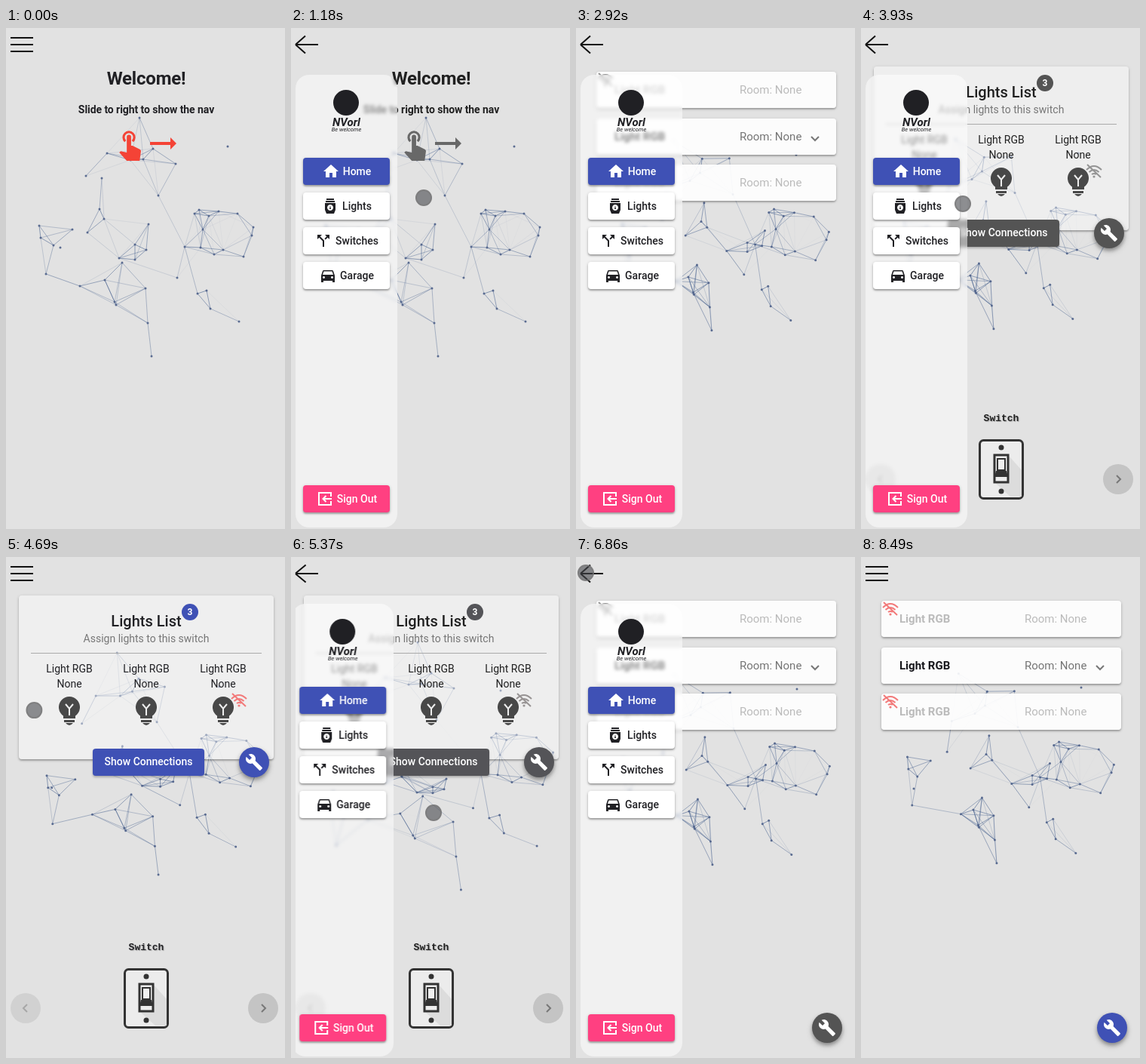
An HTML page with a canvas that plays this animation: 370 by 664 pixels, repeating every 8.53 s.

```html
<!DOCTYPE html>
<html lang="en">
<head>
<meta charset="utf-8">
<title>Smart home navigation</title>
<style>
  html, body { margin: 0; width: 100%; height: 100%; overflow: hidden; background: #e2e2e2; }
  body { font: 14px/20px Roboto, Arial, sans-serif; color: #202024; }
  #stage { position: relative; width: 370px; height: 664px; overflow: hidden; background: #e2e2e2; }
  #stage canvas, .page, #burger { position: absolute; left: 0; top: 0; width: 370px; height: 664px; }
  .page { visibility: hidden; }
  .at, .card, .fab, .menu button, .menu div { position: absolute; white-space: nowrap; }
  .mid { left: 186px; text-align: center; transform: translateX(-50%); }
  svg { display: block; fill: currentColor; overflow: visible; }
  .line { fill: none; stroke: currentColor; stroke-width: 2; }
  .red { color: #f44336; }
  .nowifi { left: 28px; width: 22px; height: 20px; color: #f27a7a; }
  .card { left: 27px; width: 318px; height: 48px; border-radius: 4px; background: rgba(255,255,255,.9);
    box-shadow: 0 2px 2px rgba(0,0,0,.22), 0 1px 4px rgba(0,0,0,.16); font-size: 15px; line-height: 48px; }
  .card b, .card span { position: absolute; top: 0; }
  .card b { left: 24px; color: #17171c; }
  .card span { left: 190px; color: #757575; }
  .card.off b, .card.off span { color: #bbb; }
  .fab { width: 40px; height: 40px; border-radius: 50%; background: #3f51b5; color: #fff;
    box-shadow: 0 3px 5px rgba(0,0,0,.3), 0 4px 9px rgba(0,0,0,.16); }
  .fab svg { position: absolute; left: 8px; top: 8px; }
  .panel { left: 17px; top: 51px; width: 338px; height: 217px; background: rgba(255,255,255,.42); }
  .title { top: 75px; font-size: 20px; font-weight: 500; }
  .badge { left: 233px; top: 62px; width: 22px; border-radius: 50%; background: #3f51b5; color: #fff;
    text-align: center; font-size: 12px; font-weight: bold; line-height: 22px; }
  .rule { left: 33px; top: 127px; width: 306px; height: 1px; background: #aaa; }
  .show { left: 115px; top: 254px; width: 148px; height: 36px; border-radius: 4px; background: #3f51b5;
    color: #fff; text-align: center; font-weight: 500; line-height: 35px; box-shadow: 0 2px 3px rgba(0,0,0,.25); }
  .name { top: 508px; font: bold 13px/20px 'Courier New', 'Liberation Mono', monospace; text-shadow: 1px 1px 1px #aaa; }
  .round { top: 578px; width: 40px; height: 40px; border-radius: 50%; background: #c4c4c4; color: #777; }
  #clip { position: absolute; left: 6px; top: 62px; width: 135px; height: 600px; overflow: hidden; }
  .menu { position: absolute; width: 135px; height: 600px; border-radius: 18px;
    background: rgba(255,255,255,.5); backdrop-filter: blur(2px); }
  .menu .logo { left: 50px; top: 20px; width: 34px; height: 34px; border-radius: 50%; background: #202024; }
  .menu .brand { width: 100%; top: 53px; text-align: center; font-size: 15px; font-weight: bold; font-style: italic; }
  .menu .motto { width: 100%; top: 63px; text-align: center; font-size: 7.5px; font-style: italic; }
  .menu button { left: 10px; width: 115px; height: 36px; padding: 0; border: 0; border-radius: 4px; background: #fff;
    color: #202024; font: 500 14px/36px Roboto, Arial, sans-serif; display: flex; gap: 4px;
    align-items: center; justify-content: center;
    box-shadow: 0 2px 2px rgba(0,0,0,.25), 0 1px 4px rgba(0,0,0,.18); }
  .menu .home { background: #3f51b5; color: #fff; }
  .menu .out { background: #ff4081; color: #fff; }
  .out svg { transform: scaleX(-1); }
  #touch { position: absolute; left: -11px; top: -11px; width: 18px; height: 18px; border-radius: 50%;
    border: 2px solid rgba(120,120,120,.65); background: rgba(70,72,78,.6); }
</style>
</head>
<body>
<svg width="0" height="0" style="position:absolute">
  <symbol id="hand" viewBox="0 0 24 24"><path class="line" style="stroke-width:1.6" d="M9 10.500a3.700 3.700 0 1 1 5 0"/><path d="M10 18.200V7.500a1.500 1.500 0 0 1 3 0v6h1l5 2.500q1 .5 .8 1.500l-.9 6.500H10L4.800 18.300l1-1z"/></symbol>
  <symbol id="house" viewBox="0 0 24 24"><path d="M10 20v-6h4v6h5v-8h3L12 3 2 12h3v8z"/></symbol>
  <symbol id="lantern" viewBox="0 0 24 24"><path fill-rule="evenodd" d="M7 2h10v2H7zM6 5h12v2H6zM5 8h14v9l-2 5H7l-2-5zM12 10a4 4 0 1 0 .01 0zM12 11l1 5h-2z"/></symbol>
  <symbol id="split" viewBox="0 0 24 24"><path d="M14 4l2.300 2.300-2.900 2.900 1.400 1.400 2.900-2.900L20 10V4zM10 4H4v6l2.300-2.300 4.700 4.700V20h2v-8.400L7.700 6.300z"/></symbol>
  <symbol id="car" viewBox="0 0 24 24"><path fill-rule="evenodd" d="M19 6q-.4-1-1.500-1h-11Q5.400 5 5 6l-2 6v9h3v-2h12v2h3v-9zM6.500 16a1.500 1.500 0 1 1 .01 0zM17.500 16a1.500 1.500 0 1 1 .01 0zM5 11l1.500-4.500h11L19 11z"/></symbol>
  <symbol id="exit" viewBox="0 0 24 24"><path class="line" d="M4 9V4h16v16H4v-5M3 12h11M10.500 8l4 4-4 4"/></symbol>
  <symbol id="wrench" viewBox="0 0 24 24"><path d="M22.700 19l-9.100-9.100c.9-2.300.4-5-1.500-6.900-2-2-5-2.400-7.400-1.300L9 6 6 9 1.600 4.700C.4 7.100.9 10.100 2.900 12.100c1.900 1.900 4.600 2.400 6.900 1.500l9.100 9.100q.7.6 1.400 0l2.300-2.300q.7-.7.1-1.400z"/></symbol>
  <symbol id="nowifi" viewBox="0 0 22 20"><path class="line" d="M1 8Q11-2 21 8M4.500 11Q11 5 17.500 11M8 14q3-2 6 0M2 1l18 17"/><circle cx="11" cy="17" r="1.600"/></symbol>
  <symbol id="bulb" viewBox="0 0 28 38"><path d="M6 25.500a14 14 0 1 1 16 0V29H6zM7 31h14v3H7zM9 35h10q-5 6-10 0z"/><path d="M9 10l5 6 5-6M14 16v9" fill="none" stroke="#eee" stroke-width="2"/></symbol>
</svg>

<div id="stage">
  <canvas id="mesh" width="370" height="664"></canvas>

  <div class="page" id="home">
    <b class="at mid" style="top:57px;font-size:24px;letter-spacing:-.2px">Welcome!</b>
    <b class="at mid" style="top:98px;letter-spacing:-.07px">Slide to right to show the nav</b>
    <svg class="at red" style="left:141px;top:130px" width="46" height="46"><use href="#hand"/></svg>
    <svg class="at red" style="left:191px;top:145px" width="35" height="16"><path d="M0 6h27V0l8 8-8 8v-6H0z"/></svg>
  </div>

  <div class="page" id="lights">
    <div class="card off" style="top:58px"><b>Light RGB</b><span>Room: None</span></div>
    <div class="card" style="top:120px"><b>Light RGB</b><span>Room: None</span>
      <svg class="at" style="left:285px;top:24px;color:#777" width="10" height="6"><path class="line" d="M0 0l5 5 5-5"/></svg></div>
    <div class="card off" style="top:181px"><b>Light RGB</b><span>Room: None</span></div>
    <svg class="at nowifi" style="top:59px"><use href="#nowifi"/></svg>
    <svg class="at nowifi" style="top:182px"><use href="#nowifi"/></svg>
    <div class="fab" id="tool" style="left:313px;top:604px"><svg width="24" height="24"><use href="#wrench"/></svg></div>
  </div>

  <div class="page" id="switches">
    <div class="card panel"></div>
    <div class="at mid title">Lights List</div>
    <div class="at badge">3</div>
    <div class="at mid" style="top:98px;color:#777">Assign lights to this switch</div>
    <div class="at rule"></div>
    <div id="lamps"></div>
    <svg class="at nowifi" style="left:298px;top:180px"><use href="#nowifi"/></svg>
    <div class="at show">Show Connections</div>
    <div class="fab" style="left:309px;top:252px"><svg width="24" height="24"><use href="#wrench"/></svg></div>
    <b class="at mid name">Switch</b>
    <svg class="at" style="left:156px;top:545px;color:#333" width="60" height="80">
      <rect class="line" style="fill:#ececec;stroke-width:3" x="1.500" y="1.500" width="57" height="77" rx="5"/>
      <path d="M39 21l18 20v35H42L21 57z" fill="#dcdcdc"/>
      <circle cx="30" cy="11" r="3.500"/><circle cx="30" cy="69" r="3.500"/>
      <path class="line" style="fill:#eee;stroke-width:3" d="M21 21h18v36H21z"/>
      <path class="line" d="M25 26h10v15H25z"/><path d="M23 42h14l2 8H21z"/>
    </svg>
    <div class="at round" style="left:6px;opacity:.55"><svg width="40" height="40"><path class="line" d="M22 15l-5 5 5 5"/></svg></div>
    <div class="at round" style="left:321px"><svg width="40" height="40"><path class="line" d="M18 15l5 5-5 5"/></svg></div>
  </div>

  <div id="clip"><div class="menu" id="menu">
    <div class="logo"></div>
    <div class="brand">NVorl</div>
    <div class="motto">Be welcome</div>
    <button class="home" style="top:110px"><svg width="24" height="24"><use href="#house"/></svg>Home</button>
    <button style="top:156px"><svg width="24" height="24"><use href="#lantern"/></svg>Lights</button>
    <button style="top:202px"><svg width="24" height="24"><use href="#split"/></svg>Switches</button>
    <button style="top:248px"><svg width="24" height="24"><use href="#car"/></svg>Garage</button>
    <button class="out" style="top:544px"><svg width="24" height="24"><use href="#exit"/></svg>Sign Out</button>
  </div></div>

  <svg id="burger" style="color:#111"><path class="line" id="bars"/></svg>
  <div id="touch"></div>
</div>

<script>
const LOOP = 8530;
const $ = id => document.getElementById(id);
const clamp = v => Math.max(0, Math.min(1, v));
const mix = (a, b, k) => a + (b - a) * k;
const easeOut = p => 1 - (1 - clamp(p)) ** 3;
const ctx = $('mesh').getContext('2d');

$('lamps').innerHTML = [84, 186, 288].map(x => `
  <div class="at mid" style="left:${x}px;top:138px">Light RGB<br>None</div>
  <svg class="at" style="left:${x - 14}px;top:185px;color:#484848" width="28" height="38"><use href="#bulb"/></svg>`).join('');

// Each group of linked points turns, stretches and drifts as one body.
class Group {
  constructor(reach, xy, ...poses) {
    const n = xy.length / 2;
    const pts = Array.from({ length: n }, (_, i) => [xy[2 * i], xy[2 * i + 1]]);
    const mean = a => pts.reduce((s, p) => s + p[a], 0) / n;
    this.reach = reach;
    this.cx = mean(0);
    this.cy = mean(1);
    this.pts = pts.map(([x, y]) => [x - this.cx, y - this.cy]);
    this.poses = [[0, 0, 1, 1, 0], ...poses];
  }
  at(from, to, k) {
    const [dx, dy, sx, sy, turn] = this.poses[from].map((v, i) => mix(v, this.poses[to][i], k));
    const c = Math.cos(turn), s = Math.sin(turn);
    return this.pts.map(([x, y]) =>
      [this.cx + dx + (x * c - y * s) * sx, this.cy + dy + (x * s + y * c) * sy]);
  }
}

// reach, points, then [dx, dy, stretch x, stretch y, turn] for two later poses
const kite = new Group(68, [106,196, 134,166, 165,175, 182,174, 195,160, 225,180, 202,222, 177,119],
  [-16, 28, 1, 1, -.6], [-9, -6, 1, 1, 0]);
const left = new Group(64, [127,199, 124,240, 130,253, 108,271, 171,287, 186,294, 150,305, 171,307, 189,260],
  [50, 10, 1.3, .6, 0], [17, 29, 1, .4, 0]);
const edge = new Group(62, [44,262, 46,278, 88,267, 63,288, 53,326],
  [13, 3, .7, 1, 0], [7, 56, 1, 1, 0]);
const low = new Group(72, [98,342, 131,334, 154,311, 144,363, 146,367, 185,345, 188,391, 193,435],
  [6, -7, .5, .7, 0], [21, 6, 1.3, 1, 0]);
const right = new Group(53, [250,246, 256,241, 282,243, 307,246, 269,249, 261,267, 328,264, 326,275, 288,294, 276,300, 258,291, 237,290, 315,303, 227,331],
  [4, 6, 1.05, 1, .1], [17, -4, 1.05, 1.1, 0]);
const wedge = new Group(62, [254,352, 266,348, 271,372, 309,389],
  [-14, 1, .7, 1.1, 0], [12, -6, 1.15, 1, 0]);
const loose = new Group(0, [294,157, 72,291], [-2, 16, 1, 1, 0], [-16, 20, 1, 1, 0]);
const groups = [kite, left, edge, low, right, wedge, loose];
const bridges = [[kite, 6, right, 11], [right, 11, wedge, 0], [right, 13, left, 6], [edge, 4, low, 0]];

// time, pose, dx, dy
const sway = [[0,0,0,0], [1180,0,2,0], [2920,1,0,-5], [3930,1,-4,-7], [5370,2,0,0], [6860,1,1,2], [8490,1,0,0]];
// time, x, y, opacity
const path = [
  [180,275,640,0], [230,260,607,1], [300,227,544,1], [370,197,463,1], [640,58,240,1],
  [1180,176,225,1], [1600,176,225,1], [2100,76,236,1], [2650,76,282,0], [3000,76,282,0], [3120,76,282,1],
  [3930,135,233,1], [4200,20,21,1], [4400,20,21,1], [4900,50,335,1], [5370,189,339,1],
  [5900,76,236,1], [6250,76,236,1], [6780,13,21,1], [7050,13,21,1], [7500,70,110,0]
];
const scenes = [[0, 'home'], [2150, 'lights'], [3150, 'switches'], [5960, 'lights']];

// Interpolates a track of [time, ...values] and returns its two keys too.
function sample(track, t) {
  let i = 0;
  while (i < track.length - 2 && t >= track[i + 1][0]) i++;
  const a = track[i], b = track[i + 1];
  const k = clamp((t - a[0]) / (b[0] - a[0]));
  return { a, b, k, v: a.map((n, j) => mix(n, b[j], k)) };
}

function link(a, b, far) {
  const d = Math.hypot(a[0] - b[0], a[1] - b[1]);
  if (d >= far) return;
  ctx.globalAlpha = .8 * (1 - (d / far) ** 2);
  ctx.beginPath();
  ctx.moveTo(...a);
  ctx.lineTo(...b);
  ctx.stroke();
}

function drawMesh(t) {
  const { a, b, k, v } = sample(sway, t);
  const placed = new Map();
  ctx.setTransform(1, 0, 0, 1, 0, 0);
  ctx.clearRect(0, 0, 370, 664);
  ctx.translate(v[2], v[3]);
  ctx.lineWidth = .8;
  ctx.strokeStyle = '#48628f';
  ctx.fillStyle = '#53658c';
  for (const g of groups) {
    const pts = g.at(a[1], b[1], k);
    placed.set(g, pts);
    pts.forEach((p, i) => pts.slice(i + 1).forEach(q => link(p, q, g.reach)));
    ctx.globalAlpha = .95;
    for (const [x, y] of pts) {
      ctx.beginPath();
      ctx.arc(x, y, 1.5, 0, 7);
      ctx.fill();
    }
  }
  for (const [g, i, h, j] of bridges) link(placed.get(g)[i], placed.get(h)[j], 95);
}

function menuOpen(t) {
  const ease = from => easeOut((t - from) / 400);
  return ease(720) - ease(4230) + ease(5100) - ease(7000);
}

function draw(t) {
  drawMesh(t);
  const open = menuOpen(t);
  const scene = scenes.filter(s => s[0] <= t).pop()[1];
  for (const id of ['home', 'lights', 'switches']) {
    $(id).style.visibility = id === scene ? 'visible' : 'hidden';
    $(id).style.filter = open > 0 ? `grayscale(${open})` : 'none';
  }
  const tool = t < 4000
    ? clamp((t - 2200) / 200) * clamp((2880 - t) / 160)
    : clamp((t - 6000) / 250);
  $('tool').style.transform = `scale(${tool})`;

  $('menu').style.transform = `translateX(${-140 * (1 - open)}px)`;
  const tip = mix(36, 19, open), shift = mix(9, 11.5, open), root = mix(9, 0, open);
  $('bars').setAttribute('d',
    `M6 ${22 - root}L${tip} ${22 - shift}M6 22H36M6 ${22 + root}L${tip} ${22 + shift}`);

  const [, x, y, seen] = sample(path, t).v;
  $('touch').style.transform = `translate(${x}px,${y}px)`;
  $('touch').style.opacity = seen;
}

let start;
function tick(now) {
  start ??= now;
  draw((now - start) % LOOP);
  requestAnimationFrame(tick);
}
draw(0);
requestAnimationFrame(tick);
</script>
</body>
</html>
```
